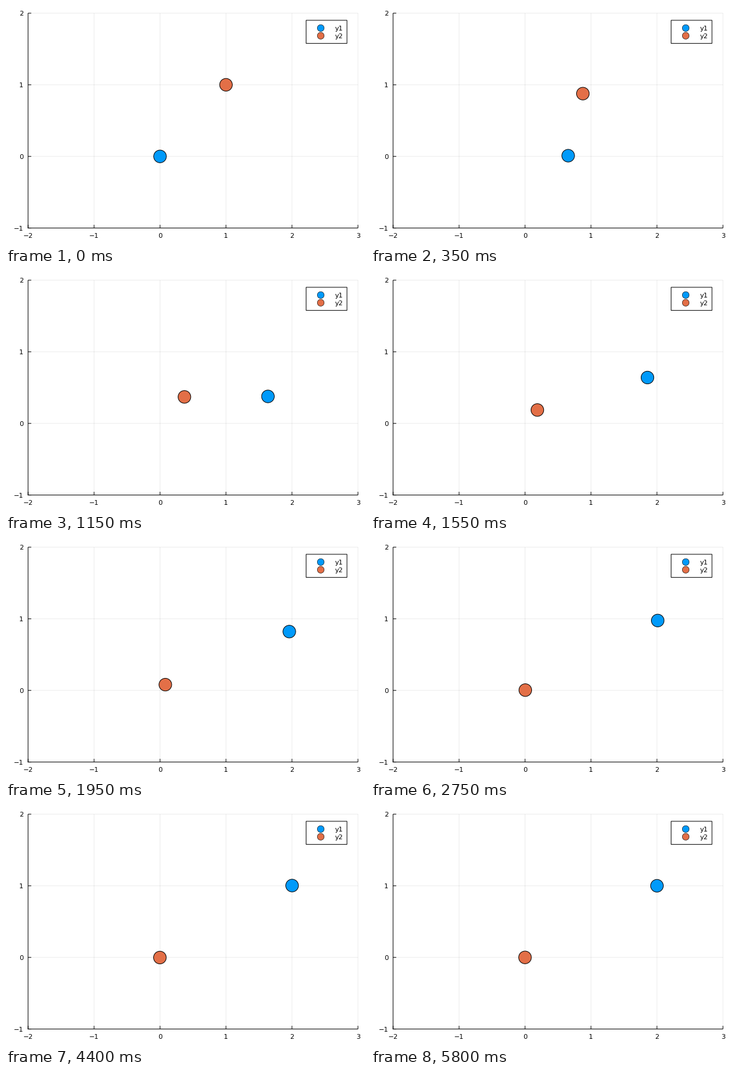
These frames come from a looping animation (600x400 px, 8 s). A matplotlib script:

```python
import math

import matplotlib.pyplot as plt
from matplotlib.animation import FuncAnimation
from matplotlib.patches import Circle, Rectangle

W, H, DPI = 600, 400, 100
STEP_MS, FRAMES = 50, 160
PX = 72 / DPI                      # one pixel in points
LEFT, RIGHT, TOP, BOTTOM = 36.9, 588.2, 12.0, 371.6
BLUE, ORANGE = "#009afa", "#e36f47"

# Damping and frequency of the controlled approach to the goal
DECAY, FREQ = 1.62, 0.95

# Remaining distance to the goal as (time, value, velocity)
BLUE_X = [(0, 2, -2), (0.75, 0.753, -1.22), (1.15, 0.364, -0.75)]
BLUE_Y = [(0, 1, 0), (0.75, 0.877, -0.52), (1.15, 0.623, -0.731)]
ORANGE_XY = [(0, 1, 0), (0.75, 0.606, -0.62), (1.15, 0.370, -0.563)]


def hermite(t, start, end):
    (t0, p0, v0), (t1, p1, v1) = start, end
    d = t1 - t0
    s = (t - t0) / d
    return ((1 + 2 * s) * (1 - s) ** 2 * p0 + s * (1 - s) ** 2 * d * v0
            + s * s * (3 - 2 * s) * p1 + s * s * (s - 1) * d * v1)


def error(t, keys):
    """Spline through the keys, then a damped oscillation to zero."""
    for start, end in zip(keys, keys[1:]):
        if t <= end[0]:
            return hermite(t, start, end)
    t0, p, v = keys[-1]
    t -= t0
    swing = p * math.cos(FREQ * t) + (v + DECAY * p) / FREQ * math.sin(FREQ * t)
    return math.exp(-DECAY * t) * swing


def to_px(x, y):
    return (LEFT + (x + 2) / 5 * (RIGHT - LEFT),
            BOTTOM - (y + 1) / 3 * (BOTTOM - TOP))


fig = plt.figure(figsize=(W / DPI, H / DPI), dpi=DPI, facecolor="white")
ax = fig.add_axes([0, 0, 1, 1])
ax.set_xlim(0, W)
ax.set_ylim(H, 0)
ax.axis("off")


def line(x0, y0, x1, y1, z=2, **style):
    ax.plot([x0, x1], [y0, y1], lw=PX, snap=False, zorder=z,
            solid_capstyle="butt", **{"color": "black", **style})


def label(x, y, text, ha):
    ax.text(x, y, text, ha=ha, va="baseline", fontsize=8,
            family="DejaVu Sans", color="black", zorder=6)


def dot(x, y, r, color, width, z):
    return ax.add_patch(Circle((x, y), r, fc=color, ec="black", lw=width * PX,
                               snap=False, zorder=z))


def number(n):
    return str(n).replace("-", "\u2212")


for n in range(-2, 4):
    x = to_px(n, 0)[0]
    line(x, TOP, x, BOTTOM, z=1, alpha=0.08)
    line(x, BOTTOM, x, BOTTOM - 5.3)
    label(x, 387.5, number(n), "center")
for n in range(-1, 3):
    y = to_px(0, n)[1]
    line(LEFT, y, RIGHT, y, z=1, alpha=0.08)
    line(LEFT, y, LEFT + 5.3, y)
    label(29.3, y + 4.1, number(n), "right")
line(LEFT, TOP, LEFT, BOTTOM + 0.5)
line(LEFT - 0.5, BOTTOM, RIGHT, BOTTOM)

ax.add_patch(Rectangle((501.6, 23.9), 68.3, 38.7, fc="white", ec="black",
                       lw=PX, snap=False, zorder=4))
for y, color, name in [(36.9, BLUE, "y1"), (49.8, ORANGE, "y2")]:
    dot(526, y, 5.7, color, 0.6, 5)
    label(549.8, y + 4.1, name, "left")

blue = dot(*to_px(0, 0), 10.6, BLUE, 1, 3)
orange = dot(*to_px(1, 1), 10.6, ORANGE, 1, 3)


def update(i):
    t = i * STEP_MS / 1000
    blue.center = to_px(2 - error(t, BLUE_X), 1 - error(t, BLUE_Y))
    d = error(t, ORANGE_XY)
    orange.center = to_px(d, d)
    return blue, orange


anim = FuncAnimation(fig, update, frames=FRAMES, interval=STEP_MS,
                     repeat=True, repeat_delay=0)
plt.show()
```
